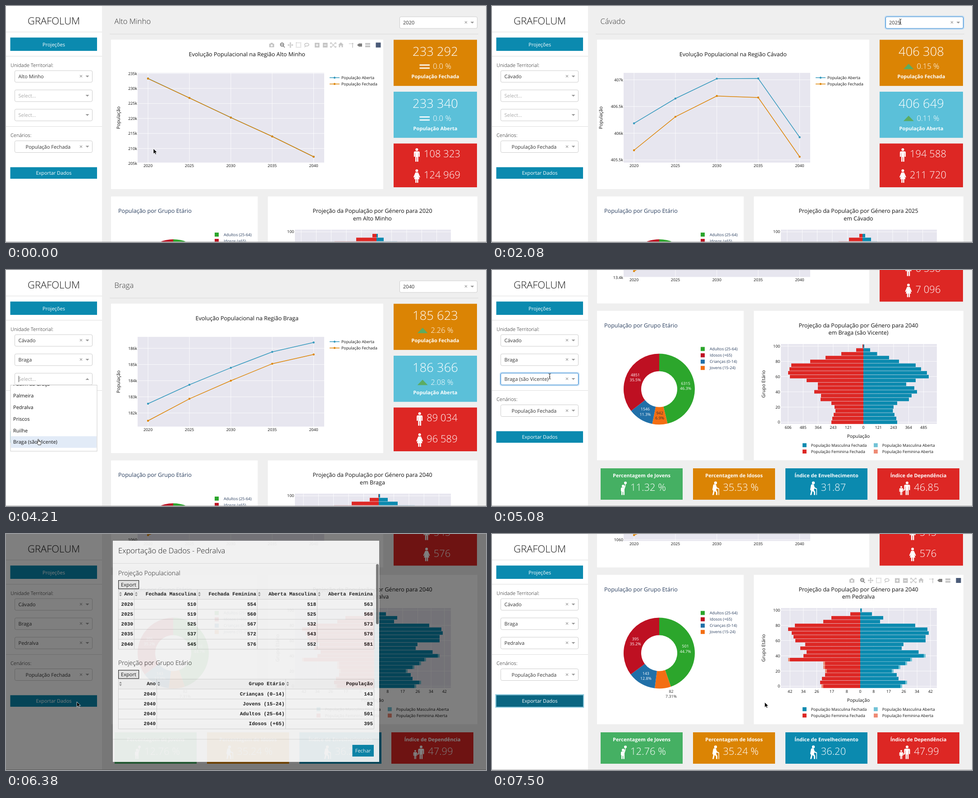
These frames come from a looping animation (1065x526 px, 7.58 s). An HTML page:

```html
<!DOCTYPE html>
<html lang="pt">
<head>
<meta charset="utf-8">
<title>Painel demográfico</title>
<style>
html, body { margin: 0; width: 100%; height: 100%; overflow: hidden; background: #efefef; }
svg { display: block; overflow: hidden; }
text { font-family: 'Open Sans', 'Noto Sans', sans-serif; fill: #111; text-rendering: geometricPrecision; }
.m { text-anchor: middle; }
.e { text-anchor: end; }
.l { font-weight: 300; }
.b { font-weight: 700; }
.w { fill: #fff; }
.g { fill: #333; }
.s { fill: #2a3f5f; }
.p { fill: #aaa; }
.t { font-family: 'Courier New', 'Liberation Mono', monospace; font-weight: 700; text-anchor: end; }
</style>
</head>
<body>
<svg id="stage" width="1065" height="526" viewBox="0 0 1065 526">
  <g id="page"></g><g id="side"></g><g id="menu"></g>
  <rect y="525" width="1065" height="1" fill="#b4b4b4"/>
  <rect id="shade" width="1065" height="526"/>
  <g id="modal"></g><g id="cursor"></g>
</svg>
<script>
const LOOP = 7580, BASE = 11.05, SMALL = 8.85;
const TEAL = '#0b8aaf', ORANGE = '#db8404', SKY = '#5bc0d9', RED = '#dd2724', GREEN = '#45b063', PLOT = '#e7e6ef';
const YEARS = [2020, 2025, 2030, 2035, 2040];

// closed/open: population per year; men: by year index; left/right: pyramid bars in px, oldest first
const REGIONS = {
  minho: {
    name: 'Alto Minho', step: 5000, men: [108323],
    closed: [233292, 226830, 220300, 214000, 207230], open: [233340, 226850, 220320, 214010, 207235],
    mid: 822, left: [0, 9, 45, 93], right: [0, 3, 16, 46], ages: [120000, 61000, 28000, 24000]
  },
  cavado: {
    name: 'Cávado', step: 500, men: [194602, 194588, 0, 0, 193020],
    closed: [405681, 406308, 406697, 406668, 405559], open: [406185, 406649, 407021, 407025, 405924],
    mid: 822, left: [0, 7, 30, 53], right: [0, 6, 19, 33], ages: [222000, 80000, 58000, 46000]
  },
  braga: {
    name: 'Braga', step: 1000, men: [0, 0, 0, 0, 89034],
    closed: [181521, 182880, 184000, 185050, 185623], open: [182575, 183750, 184800, 185785, 186366],
    mid: 827, left: [1, 20, 60, 99], right: [3, 20, 42, 80], ages: [91000, 57000, 23000, 14600]
  },
  vicente: {
    name: 'Braga (são Vicente)', step: 50, men: [0, 0, 0, 0, 6558],
    closed: [13420, 13490, 13555, 13610, 13654], open: [13435, 13506, 13572, 13626, 13670],
    mid: 824, ages: [6315, 4851, 1546, 942],
    left: [2, 16, 49, 84, 118, 160, 164, 167, 163, 126, 101, 101, 109, 94, 95, 71, 64, 62, 66, 69, 71],
    right: [2, 15, 30.5, 57, 79, 116, 128, 141, 145, 116, 95, 113, 119, 107, 101, 75, 67, 65.5, 69, 73, 75]
  },
  pedralva: {
    name: 'Pedralva', step: 20, men: [0, 0, 0, 0, 545],
    closed: [1064, 1079, 1092, 1109, 1121], open: [1081, 1093, 1105, 1121, 1133],
    mid: 817, unit: 3.71, ticks: [0, 8, 17, 26, 34, 42], ages: [501, 395, 143, 82], outside: true,
    left: [0, 22, 64, 82, 145, 160, 152, 148, 144, 122, 133, 119, 126, 156, 78, 78, 74, 78, 85, 89, 82],
    right: [3.5, 26, 51, 44, 122, 149, 152, 145, 145, 96, 92, 129.5, 141, 111, 100, 85, 70, 81, 85, 100, 89],
    moreLeft: [13, 14, 15, 16, 20], moreRight: [12, 13, 14, 15, 16, 19, 20]
  }
};
const LISTS = [
  ['Alto Minho', 'Cávado', 'Ave', 'Alto Tâmega', 'Tâmega e Sousa', 'Douro', 'Oeste', 'Algarve'],
  ['Amares', 'Barcelos', 'Braga', 'Esposende', 'Terras de Bouro', 'Vila Verde'],
  ['Adaúfe', 'Espinho', 'Esporões', 'Figueiredo', 'Gualtar', 'Lamas', 'Mire de Tibães', 'Padim da Graça',
    'Palmeira', 'Pedralva', 'Priscos', 'Ruilhe', 'Braga (são Vicente)', 'Braga (são Vítor)', 'Sequeira', 'Sobreposta'],
  [], YEARS
];

// Timeline
const NAME = [[0, 'minho'], [520, 'cavado'], [3120, 'braga'], [4330, 'vicente'], [5690, 'pedralva']];
const DATA = [[0, 'minho'], [600, 'cavado'], [3240, 'braga'], [4420, 'vicente'], [5760, 'pedralva']];
const YEAR = [[0, 0], [1640, 1], [2270, 4]];
const PICK = [
  [[0, 'Alto Minho'], [450, 'Cávado']],
  [[0, ''], [2850, 'Braga']],
  [[0, ''], [4250, 'Braga (são Vicente)'], [5600, 'Pedralva']]
];
const OPEN = [[0, -1], [280, 0], [450, -1], [1400, 4], [1640, -1], [2140, 4], [2270, -1], [2460, 1],
  [2850, -1], [3480, 2], [4250, -1], [5200, 2], [5600, -1]];
const FOCUS = [[0, -1], [280, 0], [1400, 4], [2460, 1], [3480, 2], [6140, -1], [7110, 9]];
const SCROLL = [[4600, 0], [4860, 333.5]];
const LIST_SCROLL = [[3620, 0], [4020, 195.6]];
const SHADE = [[6150, 0], [6210, .5], [7150, .5], [7240, 0]];
const MODAL = [[6230, 0], [6420, 1], [7110, 1], [7190, 0]];
const MODAL_SCROLL = [[6620, 0], [6780, 50], [6820, 50], [6960, 170]];
const MOUSE = [
  [0, 327, 318, 'arrow'], [60, 327, 318, 'arrow'], [250, 120, 157, 'beam'], [300, 120, 157, 'hand'],
  [430, 62, 209, 'hand'], [830, 62, 209, 'arrow'], [1300, 906, 35, 'beam'], [1440, 906, 35, 'hand'],
  [1600, 902, 89, 'hand'], [1700, 902, 89, 'arrow'], [1900, 906, 35, 'beam'], [2140, 906, 35, 'hand'],
  [2240, 902, 166, 'hand'], [2280, 902, 166, 'arrow'], [2380, 96, 200, 'beam'], [2520, 96, 200, 'hand'],
  [2760, 52, 278, 'hand'], [3260, 52, 278, 'arrow'], [3430, 90, 243, 'beam'], [3520, 90, 243, 'hand'],
  [3640, 72, 380, 'hand'], [4290, 72, 380, 'arrow'], [4540, 500, 380, 'arrow'], [4870, 500, 380, 'arrow'],
  [5040, 128, 237, 'beam'], [5220, 128, 237, 'hand'], [5450, 70, 302, 'hand'], [5780, 70, 302, 'arrow'],
  [6040, 103, 377, 'arrow'], [6340, 103, 377, 'arrow'], [6560, 696, 344, 'beam'], [6940, 696, 344, 'beam'],
  [7080, 790, 485, 'hand'], [7180, 790, 485, 'arrow'], [7380, 605, 375, 'arrow']
];

const step = (t, rows) => rows.filter(r => r[0] <= t).pop()[1];
function tween(t, rows, col = 1) {
  const i = rows.findIndex(r => r[0] > t);
  if (i === 0) return rows[0][col];
  if (i < 0) return rows[rows.length - 1][col];
  const a = rows[i - 1], b = rows[i], p = (t - a[0]) / (b[0] - a[0]);
  return a[col] + (b[col] - a[col]) * p * p * (3 - 2 * p);
}

// SVG helpers
const T = (x, y, s, size = BASE, cls = '', extra = '') =>
  `<text x="${x}" y="${y}" font-size="${size}" class="${cls}" ${extra}>${s}</text>`;
const R = (x, y, w, h, fill, extra = '') => `<rect x="${x}" y="${y}" width="${w}" height="${h}" fill="${fill}" ${extra}/>`;
const P = (d, fill, extra = '') => `<path d="${d}" fill="${fill}" ${extra}/>`;
const C = (x, y, r, fill) => `<circle cx="${x}" cy="${y}" r="${r}" fill="${fill}"/>`;
const at = (x, y, s) => `<g transform="translate(${x} ${y})">${s}</g>`;
const turned = (x, y, s) => T(0, 0, s, 10.32, 'm', `transform="translate(${x} ${y}) rotate(-90)"`);
const spaced = n => String(n).replace(/\B(?=(\d{3})+$)/g, ' ');
const widths = { ' ': .26, '.': .26, '%': .8, '-': .32 };
const wide = (s, size) => size * [...s].reduce((n, c) => n + (widths[c] || .571), 0);

const MAN = C(0, -12, 3, '#fff') + P('M-4-8h8q2.5 0 2.5 2.5V4h-2.6V-4h-.6V15H.6V5h-1.2v10h-2.7V-4h-.6v8h-2.6v-9.5q0-2.5 2.5-2.5z', '#fff');
const WOMAN = C(0, -12, 3, '#fff') + P('M-3-8h6l4.5 10.5-2.2 1-2.6-6 3.3 9.5H3.2V15H.6V7h-1.2v8h-2.6V7H-6l3.3-9.5-2.6 6-2.2-1z', '#fff');
const CHILD = C(-1, -5, 3, '#fff') + C(4, -12, 3, '#fff') +
  P('M-5 15V6l-1 1V1q0-3 3-3h4l2-4V-10h1.4v5L2 2v13H-.8V8h-1.4v7z', '#fff');
const ELDER = C(0, -12, 3.2, '#fff') +
  P('M-5-8q3-2 6 0L3-2l5 2.5V15H6.6V2L2 .5 1.5 4 4 8v7H1.2V9L-2 6l-2 9h-3l2-9-2-3z', '#fff');
const FAMILY = at(5, 0, MAN) + at(-8, 5, `<g transform="scale(.66)">${MAN}</g>`) + R(-5, 3, 5, 2, '#fff');

const caret = (x, y, up) => P(up ? `M${x - 4} ${y + 2}h8l-4-4z` : `M${x - 4} ${y - 2}h8l-4 4z`, '#999');

function select(x, y, value, focus, open, indent = 9) {
  const w = 172, on = focus && !open;
  return (on ? R(x - 1.5, y - 1.5, w + 3, 29, 'none', 'rx="4" stroke="#b8d8f2" stroke-width="2"') : '') +
    R(x, y, w, 26, '#fff', `rx="3" stroke="${on ? '#2b83d0' : '#ccc'}"`) +
    T(x + indent, y + 17.3, value || 'Select...', BASE, value ? 'g' : 'p') +
    (open ? R(x + 8.4, y + 6, .9, 14, '#333') : '') +
    (value ? T(x + 147, y + 17.3, '×', 13, 'm', 'style="fill:#888"') : '') + caret(x + 161, y + 13, open);
}

function modebar(dx, y) {
  const ln = (d, extra = '') => P(d, 'none', `stroke="#444" stroke-width="1.6" ${extra}`);
  const weak = R(584, -3, 11, 8, '#444', 'rx="1"') + R(587, -5, 5, 3, '#444') + C(589.5, 1, 2.2, '#fff') +
    ln('M626 0h10M631-5v10') + P('M624.5 0l3-2.5v5zM637.5 0l-3-2.5v5zM631-6.5l2.5 3h-5zM631 6.5l2.5-3h-5z', '#444') +
    ln('M644-5h10v10h-10z', 'stroke-dasharray="2 1.2"') +
    ln('M663 5l1-3c-6-5 7-9 8-3 0 3-5 4-8 3') +
    R(685, -5, 10.5, 10.5, '#444') + R(703, -5, 10.5, 10.5, '#444') +
    P('M687.5-.5h5.5v1.4h-5.5zM689.6-2.6h1.4v5.6h-1.4zM705.5-.5h5.5v1.4h-5.5z', '#fff') +
    ln('M722-4l8 8M730-4l-8 8M720-2v-3h3M729-5h3v3M732 2v3h-3M723 5h-3V2') +
    P('M743-6l6 5.5h-1.5V5h-3V1h-3v4h-3V-.5H737z', '#444') +
    ln('M761-3h8', 'stroke-dasharray="2 1"') + ln('M769-1v7') + C(769, -3, 1.8, '#444') +
    R(797, -4.5, 11, 4, '#444') + R(797, 1, 11, 4, '#444');
  const strong = `<circle cx="612.5" cy="-1" r="3.6" fill="none" stroke="#444" stroke-width="1.8"/>` + ln('M615 2l3.5 3.5') + ln('M610.5-1h4') +
    P('M779 0l4-3.6h7v7.2h-7z', '#444');
  return at(dx, y, `<g opacity=".3">${weak}</g><g opacity=".7">${strong}</g>` + R(820.5, -5.5, 11, 11, '#4b5b78'));
}

function lineChart(r) {
  const all = [...r.closed, ...r.open], lo = Math.min(...all), hi = Math.max(...all), k = 174.5 / (hi - lo);
  const X = i => 315.1 + 91.87 * i, Y = v => 336 - (v - lo) * k;
  let s = R(292, 149, 414, 200, PLOT), longest = 0;
  for (let i = 0; i < 5; i++) s += R(X(i) - .4, 149, .8, 200, '#fff') + T(X(i), 358.7, YEARS[i], SMALL, 'm');
  for (let v = Math.ceil((lo - 13 / k) / r.step - .1) * r.step; Y(v) > 148; v += r.step) {
    const label = v >= 1e4 ? v / 1000 + 'k' : String(v);
    longest = Math.max(longest, label.length);
    if (Y(v) < 349) s += R(292, Y(v) - .4, 414, .8, '#fff');
    s += T(291, Y(v) + 3.1, label, SMALL, 'e');
  }
  [[r.open, '#3599bd', 'Aberta'], [r.closed, '#dd8505', 'Fechada']].forEach(([v, c, name], n) => {
    const y = 159.7 + 14.1 * n;
    s += P('M' + v.map((p, i) => X(i) + ' ' + Y(p)).join('L'), 'none', `stroke="${c}" stroke-width="1.5"`) +
      v.map((p, i) => C(X(i), Y(p), 2.2, c)).join('') +
      R(718, y - .75, 22, 1.5, c) + C(729, y, 2.2, c) + T(744, y + 3.2, 'População ' + name, SMALL);
  });
  return s + turned(253 - (longest - 4) * 4.2, 249, 'População') +
    T(534.7, 111.7, 'Evolução Populacional na Região ' + r.name, 12.55, 'm');
}

function pie(r) {
  const cx = 371, cy = 599, sum = r.ages.reduce((a, b) => a + b);
  const colors = ['#2ca62c', '#be1022', '#2170a8', '#f36e13'];
  const names = ['Adultos (25-64)', 'Idosos (+65)', 'Crianças (0-14)', 'Jovens (15-24)'];
  const pt = (a, rad) => `${cx + rad * Math.sin(a)} ${cy - rad * Math.cos(a)}`;
  let s = T(249, 461.3, 'População por Grupo Etário', 12.55, 's'), a = 0;
  for (const i of [0, 3, 2, 1]) {
    const part = r.ages[i] / sum, b = a + part * 2 * Math.PI, mid = (a + b) / 2, big = part > .5 ? 1 : 0;
    s += P(`M${pt(a, 79)}A79 79 0 ${big} 1 ${pt(b, 79)}L${pt(b, 40)}A40 40 0 ${big} 0 ${pt(a, 40)}z`, colors[i]);
    const out = i === 3 && r.outside, cls = i === 3 ? 'm g' : 'm w';
    const x = out ? 397.5 : cx + 59 * Math.sin(mid), y = out ? 690 : cy - 59 * Math.cos(mid);
    s += T(x, y - 2.6, r.ages[i], SMALL, cls) + T(x, y + 8.9, +(part * 100).toPrecision(3) + '%', SMALL, cls);
    a = b;
  }
  names.forEach((n, i) => {
    const y = 509.5 + 14.1 * i;
    s += R(463, y - 4.5, 9, 9, colors[i]) + T(483, y + 3.1, n, SMALL, 's');
  });
  return s;
}

function pyramid(r, year) {
  const top = 498.5, h = 178, unit = r.unit || .2756, Y = a => 672.8 - a * 1.695;
  let s = R(641, top, 346, h, PLOT);
  for (const v of r.ticks || [0, 121, 243, 364, 485, 606])
    for (const x of v ? [r.mid - v * unit, r.mid + v * unit] : [r.mid])
      if (x > 641 && x < 987) s += R(x - .4, top, .8, h, '#fff') + T(x, 687, v, SMALL, 'm');
  for (let a = 0; a <= 100; a += 20) s += R(641, Y(a) - .4, 346, .8, '#fff') + T(639, Y(a) + 3.1, a, SMALL, 'e');
  const bar = (n, w, sign, c) => R(sign < 0 ? r.mid - w : r.mid, Y(100 - 5 * n) - 3.9, w, 7.8, c);
  r.left.forEach((w, n) => {
    if (r.moreLeft && r.moreLeft.includes(n)) s += bar(n, w + 4, -1, '#ee8a74');
    if (r.moreRight && r.moreRight.includes(n)) s += bar(n, r.right[n] + 4, 1, '#72c3d6');
    s += bar(n, w, -1, RED) + bar(n, r.right[n], 1, TEAL);
  });
  [['Masculina Fechada', TEAL, 689, 0], ['Feminina Fechada', RED, 689, 1],
    ['Masculina Aberta', '#72c3d6', 847, 0], ['Feminina Aberta', '#ee8a74', 847, 1]].forEach(([n, c, x, row]) => {
    const y = 724 + 14.1 * row;
    s += R(x, y - 4.4, 8.8, 8.8, c) + T(x + 18.7, y + 3.1, 'População ' + n, SMALL);
  });
  return s + T(813, 461.3, 'Projeção da População por Género para ' + YEARS[year], 12.55, 'm') +
    T(813, 477.6, 'em ' + r.name, 12.55, 'm') + T(813, 707.6, 'População', 10.32, 'm') + turned(605.5, 587.5, 'Grupo Etário');
}

function growthCard(y, color, series, year, name) {
  const g = (series[year] / series[0] - 1) * 100, pct = (year ? g.toFixed(2) : '0.0') + ' %';
  const x = 967.5 - wide(pct, 16.6) / 2 - 29.5;
  const icon = !year ? R(x, 55, 22.5, 2.6, '#fff') + R(x, 61.8, 22.5, 2.6, '#fff')
    : g > 0 ? P(`M${x} 65.5h23l-11.5-12z`, '#5cac62') : P(`M${x} 53.5h23l-11.5 12z`, '#d9534f');
  return at(0, y, R(860, 0, 185, 102.8, color) + T(952.5, 36.2, spaced(series[year]), 27.4, 'm l w') + icon +
    T(967.5, 65, pct, 16.6, 'm l w') + T(952.5, 85.7, 'População ' + name, BASE, 'm b w'));
}

function genderRow(y, icon, n) {
  const s = spaced(n);
  return at(967.5 - wide(s, 22) / 2 - 15.5, y - 5, icon) + T(967.5, y, s, 22, 'm l w');
}

function indexCards([adults, old, kids, young]) {
  const sum = adults + old + kids + young, f = v => (v * 100).toFixed(2);
  return [
    ['Percentagem de Jovens', f(kids / sum) + ' %', GREEN, CHILD, 241, -40, 14.5],
    ['Percentagem de Idosos', f(old / sum) + ' %', ORANGE, ELDER, 446, -41, 15],
    ['Índice de Envelhecimento', f(kids / old), TEAL, ELDER, 651, -29, 15.5],
    ['Índice de Dependência', f((kids + old) / sum), RED, FAMILY, 855, -30, 18]
  ].map(([name, v, c, icon, x, ix, tx]) => at(x + 91, 775.5,
    R(-91, 0, 182, 70, c) + T(0, 20.3, name, BASE, 'm b w') + at(ix, 44.5, icon) + T(tx, 49.5, v, 22, 'm l w'))).join('');
}

function page(t, m, scroll) {
  const r = REGIONS[step(t, DATA)], title = REGIONS[step(t, NAME)].name, pick = step(t, YEAR);
  const year = step(t - 60 < 0 ? 0 : t - 60, YEAR);
  const open = step(t, OPEN), focus = step(t, FOCUS), men = r.men[year] || Math.round(r.closed[year] * .48);
  const py = m.y + scroll, free = tween(t, MODAL) === 0 && open < 0;
  const over = (x0, x1, y0, y1) => free && m.x > x0 && m.x < x1 && py > y0 && py < y1;
  const card = (x, y, w) => R(x, y, w, 333, '#fff');
  return at(0, -scroll, T(240.5, 40, title, 16.6, 'l g') + R(230, 62, 818, 1, '#d9d9d9') +
    select(873.5, 24, YEARS[pick], focus === 4, open === 4, 7.5) +
    card(233, 75, 604) + lineChart(r) + (over(233, 837, 75, 408) ? modebar(0, 87) : '') +
    growthCard(75.3, ORANGE, r.closed, year, 'Fechada') + growthCard(191, SKY, r.open, year, 'Aberta') +
    R(860, 306.5, 185, 97.5, RED) + genderRow(337, MAN, men) + genderRow(384, WOMAN, r.closed[year] - men) +
    card(233, 424.5, 325.5) + pie(r) + card(581, 424.5, 465) + pyramid(r, year) +
    (over(581, 1046, 424, 757) ? modebar(209, 437) : '') + indexCards(r.ages) +
    (open === 4 ? list(873.5, 50, 172, LISTS[4], 0, m) : ''));
}

function side(t) {
  const open = step(t, OPEN), focus = step(t, FOCUS), active = focus === 9;
  const rule = y => R(0, y, 213, 1, '#dedede');
  return R(0, 0, 213, 526, '#fff') + T(106, 40.8, 'GRAFOLUM', 22, 'm l') + rule(57.5) + rule(111.5) + rule(268) +
    R(9.5, 70.3, 192.5, 29.7, TEAL) + T(106, 89.6, 'Projeções', BASE, 'm w') +
    T(10, 135.6, 'Unidade Territorial:', BASE, 'l') +
    PICK.map((rows, i) => select(19.5, 144 + 43 * i, step(t, rows), focus === i, open === i, 8)).join('') +
    T(10, 291.7, 'Cenários:', BASE, 'l') + select(19.5, 300.5, 'População Fechada', false, false, 24) +
    (active ? R(8.5, 358.3, 194.5, 27.7, 'none', 'stroke="#8cc9dd" stroke-width="2.4"') : '') +
    R(9.5, 359.3, 192.5, 25.7, active ? '#0a6682' : TEAL) + T(106, 376.2, 'Exportar Dados', 10.9, 'm w');
}

function list(x, y, w, items, scroll, m) {
  const row = 25.8, h = Math.min(147.4, items.length * row);
  const inside = m.x > x && m.x < x + w && m.y > y && m.y < y + h;
  const hover = inside ? Math.floor((m.y + 3 - y + scroll) / row) : -1;
  return R(x, y, w, h, '#fff', 'stroke="#ccc"') + `<svg x="${x}" y="${y}" width="${w}" height="${h}">` +
    items.map((s, i) => (i === hover ? R(1, i * row - scroll, w - 2, row, '#e2ebf7') : '') +
      T(6, i * row - scroll + 16.8, s)).join('') + '</svg>';
}

function menu(t, m) {
  const i = step(t, OPEN);
  return i < 0 || i > 2 ? '' : list(10, 170.5 + 43 * i, 192, LISTS[i], i === 2 ? tween(t, LIST_SCROLL) : 0, m);
}

function table(y, title, edges, head, rows) {
  const h = 22.25, n = rows.length + 1, line = '#d3d3d3';
  let s = T(249, y, title, 13.9, 'l') + R(249.6, y + 11.6, 45, 18.6, '#efefef', 'stroke="#222" stroke-width="1.2"') +
    T(272, y + 24.8, 'Export', BASE, 'm') + R(249, y + 31, 567, h, '#fafafa');
  for (let i = 0; i <= n; i++) s += R(249, y + 31 + i * h, 567, .8, line);
  edges.forEach(x => { s += R(x, y + 31, .8, n * h, line); });
  [head, ...rows].forEach((row, i) => row.forEach((c, j) => { s += T(edges[j + 1] - 2, y + 45.5 + i * h, c, 11, 't'); }));
  head.forEach((c, j) => { s += P(`M${edges[j] + 2} ${y + 41}h6l-3-4zM${edges[j] + 2} ${y + 43}h6l-3 4z`, '#999'); });
  return s;
}

function modalBody() {
  const r = REGIONS.pedralva, women = [554, 560, 567, 572, 576], men = [510, 519, 525, 537, 545];
  const openMen = [518, 525, 532, 543, 552], sexes = ['Fechada Masculina', 'Fechada Feminina', 'Aberta Masculina', 'Aberta Feminina'];
  const total = YEARS.map((y, i) => [y, men[i], women[i], openMen[i], r.open[i] - openMen[i]]);
  const groups = ['Crianças (0–14)', 'Jovens (15–24)', 'Adultos (25–64)', 'Idosos (+65)'];
  const byGroup = [2, 3, 0, 1].map((k, i) => [2040, groups[i], r.ages[k]]);
  const count = px => Math.round(px / 3.71);
  const detail = r.left.map((_, i) => {
    const n = 20 - i, a = count(r.right[n]), b = count(r.left[n]);
    return [2040, i < 20 ? `${i * 5}-${i * 5 + 4}` : '100+', a, b, a + r.moreRight.includes(n), b + r.moreLeft.includes(n)];
  });
  return table(96, 'Projeção Populacional', [249, 284, 424, 557, 690, 816], ['Ano', ...sexes], total) +
    table(296, 'Projeção por Grupo Etário', [249, 334, 620, 816], ['Ano', 'Grupo Etário', 'População'], byGroup) +
    table(473, 'Projeção por Grupo Etário Detalhado', [249, 281, 367, 486, 597, 709, 816], ['Ano', 'Grupo Etário', ...sexes], detail);
}
const BODY = modalBody();

function modal(t) {
  const show = tween(t, MODAL), scroll = tween(t, MODAL_SCROLL);
  if (!show) return '';
  return `<g opacity="${show}" transform="translate(0 ${-37 * (1 - show)})">` +
    R(237, 19, 591, 493, '#fff') + T(249, 47, 'Exportação de Dados - Pedralva', 16.6, 'l') +
    `<svg x="237" y="70" width="591" height="391" viewBox="237 70 591 391">${at(0, -scroll, BODY)}` +
    R(821, 71 + scroll * .343, 6, 134, '#7d7d7d', 'rx="3"') + '</svg>' +
    R(237, 69, 591, .8, '#ddd') + R(237, 461, 591, .8, '#ddd') +
    R(768.5, 474, 47.5, 26, TEAL) + T(792, 491.2, 'Fechar', BASE, 'm w') + '</g>';
}

const POINTERS = {
  arrow: P('M0 0v11.5l2.7-2.5 1.8 4 2-.9-1.8-3.9h3.6z', '#000', 'stroke="#fff" stroke-width=".8"'),
  beam: P('M-2.5-6q2 0 2.5 1.2Q.5-6 2.5-6M0-5V5M-2.5 6q2 0 2.5-1.2Q.5 6 2.5 6M-1.3 1.5h2.6', 'none', 'stroke="#111"'),
  hand: P('M-1.5-1.5q0-1.3 1.1-1.3T.7-1.5V2l1.7.2 1.6.4 1.5.6q.8.4.6 1.8L5.5 8 5 9.8h-5.6L-2 7-4 4.6q.6-1.3 1.7-.4l.8.9z',
    '#fff', 'stroke="#111" stroke-width=".9"')
};

const cache = {}, $ = id => document.getElementById(id);
function put(id, html) {
  if (cache[id] !== html) $(id).innerHTML = cache[id] = html;
}

function draw(t) {
  const kind = MOUSE.filter(r => r[0] <= t).pop()[3];
  const m = { x: tween(t, MOUSE), y: tween(t, MOUSE, 2) };
  put('page', page(t, m, tween(t, SCROLL)));
  put('side', side(t));
  put('menu', menu(t, m));
  put('modal', modal(t));
  put('cursor', at(m.x, m.y, POINTERS[kind]));
  $('shade').setAttribute('opacity', tween(t, SHADE));
}

const start = performance.now();
function tick() {
  draw((performance.now() - start) % LOOP);
  requestAnimationFrame(tick);
}
tick();
</script>
</body>
</html>
```
